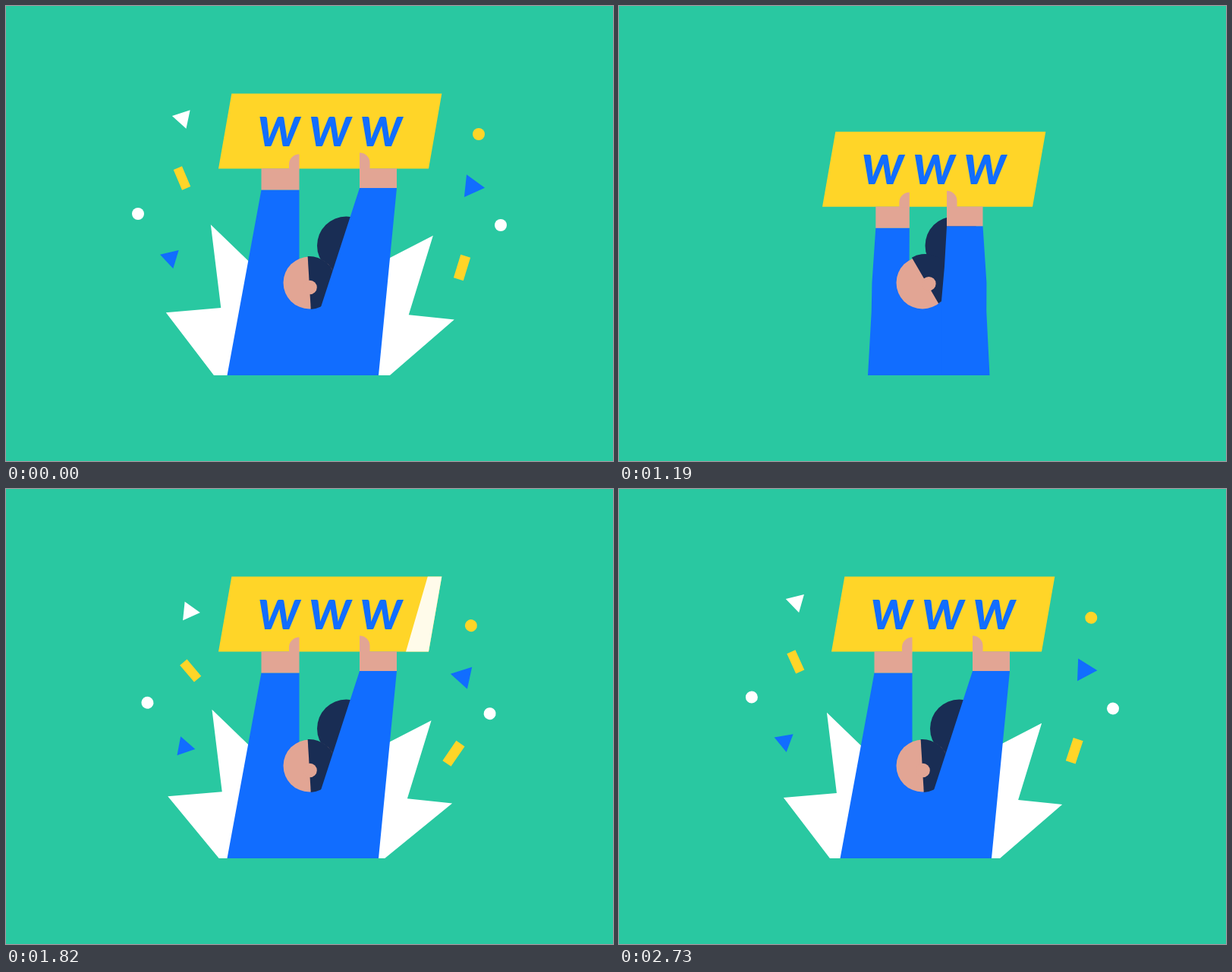
Animation, 800 px wide and 600 px high, one loop 2800 ms. Source, as an HTML page with a canvas:

```html
<!DOCTYPE html>
<html lang="en">
<head>
<meta charset="utf-8">
<title>www</title>
<style>
html, body { margin: 0; width: 100%; height: 100%; overflow: hidden; background: #29c8a1; }
canvas { display: block; }
</style>
</head>
<body>
<canvas id="stage" width="800" height="600"></canvas>
<script>
const ctx = document.getElementById('stage').getContext('2d');
// The cycle runs from the leap to the next leap; PEAK is the moment the arms are fully up
const LOOP = 2800, LEAP = 1190, PEAK = 1330, DROP = 2940;
const GREEN = '#29c8a1', YELLOW = '#ffd528', BLUE = '#116dff', SKIN = '#e2a594', NAVY = '#192d54', WHITE = '#fff';

const lerp = (a, b, f) => a + (b - a) * f;

// Smooth step from 0 to 1 between two times
function ease(t, from, to) {
  const f = Math.min(1, Math.max(0, (t - from) / (to - from)));
  return f * f * (3 - 2 * f);
}

// 0 arms up, 1 standing, above 1 crouching
const squatAt = t => 2.14 * (1 - ease(t, LEAP - 130, PEAK)) + ease(t, DROP, DROP + 140)
  + 1.14 * ease(t, 3250, 3750) - 2.14 * ease(t, LEAP + LOOP - 130, PEAK + LOOP);

const stretchAt = t => ease(t, LEAP, PEAK) - ease(t, PEAK, PEAK + 140);

function wobbleAt(t) {
  const after = Math.max(0, t - PEAK);
  return ease(t, LEAP, PEAK) * Math.cos(after * Math.PI / 150) * Math.exp(-after / 80);
}

// Explosive start that settles into a slow linear drift: 0 at PEAK, 1 after 1470 ms
function settle(t, kick) {
  const after = t - PEAK;
  return kick + (1 - kick) * after / 1470 - kick * Math.exp(-after / 33);
}

function poseAt(t) {
  const squat = squatAt(t), up = Math.max(0, 1 - squat), bend = Math.max(0, squat - 1);
  const lean = stretchAt(t), signY = 262.6 - 48 * up + 19 * bend;
  const leftX = 338.5 - 2 * up - 1.5 * bend, rightX = 432 + 34 * up;
  const leftY = signY + 28, rightY = signY + 25.5;
  return {
    sign: [268 + 12 * up, signY],
    left: { outer: [leftX, leftY], inner: [leftX + 44.5 + 5.5 * up, leftY], base: [328 - 36.5 * up, 487], push: -9 * bend },
    right: { outer: [rightX + 47.5 + 1.5 * up, rightY], inner: [rightX, rightY], base: [488.5 + 2.5 * up, 487], push: 13 * bend },
    armpit: [424.5 - 9.5 * up + 4.5 * bend, 389 + 8 * up - 4 * bend],
    bun: [442 + 6.5 * up + 1.5 * lean, 316],
    hair: [403.5 - 3.8 * up, 362 + 3 * up],
    ear: [408.3 - 7.8 * up, 366.2 + 4.8 * up],
    tilt: (25.4 * up - 12 * bend + 5.4 * lean - 28.8) * Math.PI / 180
  };
}

// Shape, colour, size, resting place around the blast centre, reach at PEAK, resting angle
const confetti = [
  ['dot', WHITE, 8, -226, -141, .86],
  ['dot', YELLOW, 8, 223, -246, .885],
  ['dot', WHITE, 8, 252, -126, .855],
  ['tri', WHITE, 14.4, -167, -267, .87, 72],
  ['tri', BLUE, 14.6, -183, -83, .75, 77],
  ['tri', BLUE, 17.2, 214, -177, .865, 6],
  ['bar', YELLOW, 29, -168, -188, .83, 67],
  ['bar', YELLOW, 32, 201, -70, .86, 107]
];

function poly(points, color) {
  ctx.beginPath();
  points.forEach(p => ctx.lineTo(...p));
  ctx.closePath();
  ctx.fillStyle = color;
  ctx.fill();
}

function disc([x, y], r, color, from = 0, to = 7) {
  ctx.beginPath();
  ctx.arc(x, y, r, from, to);
  ctx.fillStyle = color;
  ctx.fill();
}

function drawBurst(t) {
  const pulse = (1 - Math.cos((t - 1600) / 140 * Math.PI)) / 2;
  const size = (ease(t, LEAP, PEAK) - ease(t, DROP, DROP + 70)) * (1 + .057 * pulse);
  const spread = 5 * ease(t, 2030, 2730);
  ctx.save();
  ctx.translate(392, 487);
  ctx.scale(size, size);
  poly([[0, 0], [-109 - spread, 0], [-175, -80], [-105, -86], [-118, -192], [-32, -109]], WHITE);
  poly([[0, 0], [105 + spread, 0], [192, -71], [134, -77], [165, -178], [68, -128]], WHITE);
  ctx.restore();
}

function drawConfetti(t) {
  if (t < 1240 || t > DROP + 35) return;
  const drift = settle(t, .41), spin = settle(t, .15);
  for (const [shape, color, size, x, y, reach, angle = 0] of confetti) {
    const far = lerp(reach, 1, drift), side = Math.sign(x);
    const turn = shape === 'tri' ? 95 * side * (spin - 1) : -44 * side * (drift - 1);
    ctx.save();
    ctx.translate(400 + x * far, 415 + y * far);
    ctx.rotate((angle + turn) * Math.PI / 180);
    if (shape === 'dot') disc([0, 0], size, color);
    else if (shape === 'tri') poly([0, 1, 2].map(i => {
      const a = i * Math.PI * 2 / 3;
      return [size * Math.cos(a), size * Math.sin(a)];
    }), color);
    else {
      ctx.fillStyle = color;
      ctx.fillRect(-size / 2, -size * .21, size, size * .42);
    }
    ctx.restore();
  }
}

function drawSign([x, y], t) {
  const h = 99 + 13.5 * stretchAt(t), slant = h * .175;
  ctx.save();
  poly([[x, y], [x + slant, y - h], [x + 277 + slant, y - h], [x + 277, y]], YELLOW);
  ctx.clip();
  ctx.font = 'italic 700 76px Lato, "Open Sans", sans-serif';
  ctx.fillStyle = BLUE;
  const ink = ctx.measureText('w');
  const center = (ink.actualBoundingBoxLeft - ink.actualBoundingBoxRight) / 2;
  [7.5, 10.5, 3].forEach((lag, i) => {
    const dy = lag * wobbleAt(t);
    ctx.fillText('w', x + 82 + 67.4 * i + center - dy * .2, y - 30 + dy);
  });
  const shine = (t - 1610) * .9;
  ctx.globalAlpha = .9;
  poly([[366, 115], [408, 115], [388, 215], [337, 215]].map(([px, py]) => [px + shine, py]), WHITE);
  ctx.restore();
}

// Palm plus a thumb that is rounded on its outer side
function drawHand({ outer, inner }, signY, thumb) {
  const side = Math.sign(outer[0] - inner[0]), x = inner[0], edge = x + side * 13.5, tip = signY - thumb;
  poly([[outer[0], signY - .3], [x, signY - .3], inner, outer], SKIN);
  ctx.beginPath();
  ctx.moveTo(x, signY + 1);
  ctx.lineTo(x, tip);
  ctx.arcTo(edge, tip, edge, tip + 13, 13);
  ctx.lineTo(edge, signY + 1);
  ctx.fill();
}

// Sleeve from the wrist to the hem; push moves the elbow out, rest closes the shape
function drawSleeve({ outer, base, push }, rest) {
  const at = (y, shift) => [lerp(outer[0], base[0], (y - outer[1]) / (base[1] - outer[1])) + shift, y];
  const elbow = at(365, push), waist = at(403, -push * .25);
  ctx.beginPath();
  ctx.moveTo(...outer);
  ctx.arcTo(...elbow, ...waist, 14);
  [waist, base, ...rest].forEach(p => ctx.lineTo(...p));
  ctx.fillStyle = BLUE;
  ctx.fill();
}

function drawPerson({ left, right, armpit, hair, ear, tilt, sign }) {
  drawSleeve(left, [[440, 487], armpit, [left.inner[0] + left.push * .25, 345], left.inner]);
  disc([400, 365], 34.5, SKIN);
  disc(hair, 35, NAVY, tilt - Math.PI / 2, tilt + Math.PI / 2);
  disc(ear, 9.3, SKIN);
  const crook = [lerp(right.inner[0], armpit[0], .55) + right.push * .5, lerp(right.inner[1], armpit[1], .55)];
  drawSleeve(right, [[armpit[0], 487], armpit, crook, right.inner]);
  drawHand(left, sign[1], 19);
  drawHand(right, sign[1], 21);
}

function drawTwinkle(t) {
  const r = 19 * Math.sin((t - 1470) / 280 * Math.PI);
  if (t < 1470 || t > 1750) return;
  ctx.beginPath();
  ctx.moveTo(337 - r, 146.5 - r);
  for (const [sx, sy] of [[1, -1], [1, 1], [-1, 1], [-1, -1]])
    ctx.quadraticCurveTo(337, 146.5, 337 + sx * r, 146.5 + sy * r);
  ctx.fillStyle = WHITE;
  ctx.fill();
}

function draw(now) {
  const time = now % LOOP, t = time < LEAP ? time + LOOP : time;
  const pose = poseAt(t);
  ctx.fillStyle = GREEN;
  ctx.fillRect(0, 0, 800, 600);
  drawBurst(t);
  drawConfetti(t);
  disc(pose.bun, 38.5, NAVY);
  drawSign(pose.sign, t);
  drawPerson(pose);
  drawTwinkle(t);
}

const start = performance.now();
function tick() {
  draw(performance.now() - start);
  requestAnimationFrame(tick);
}
tick();
</script>
</body>
</html>
```
